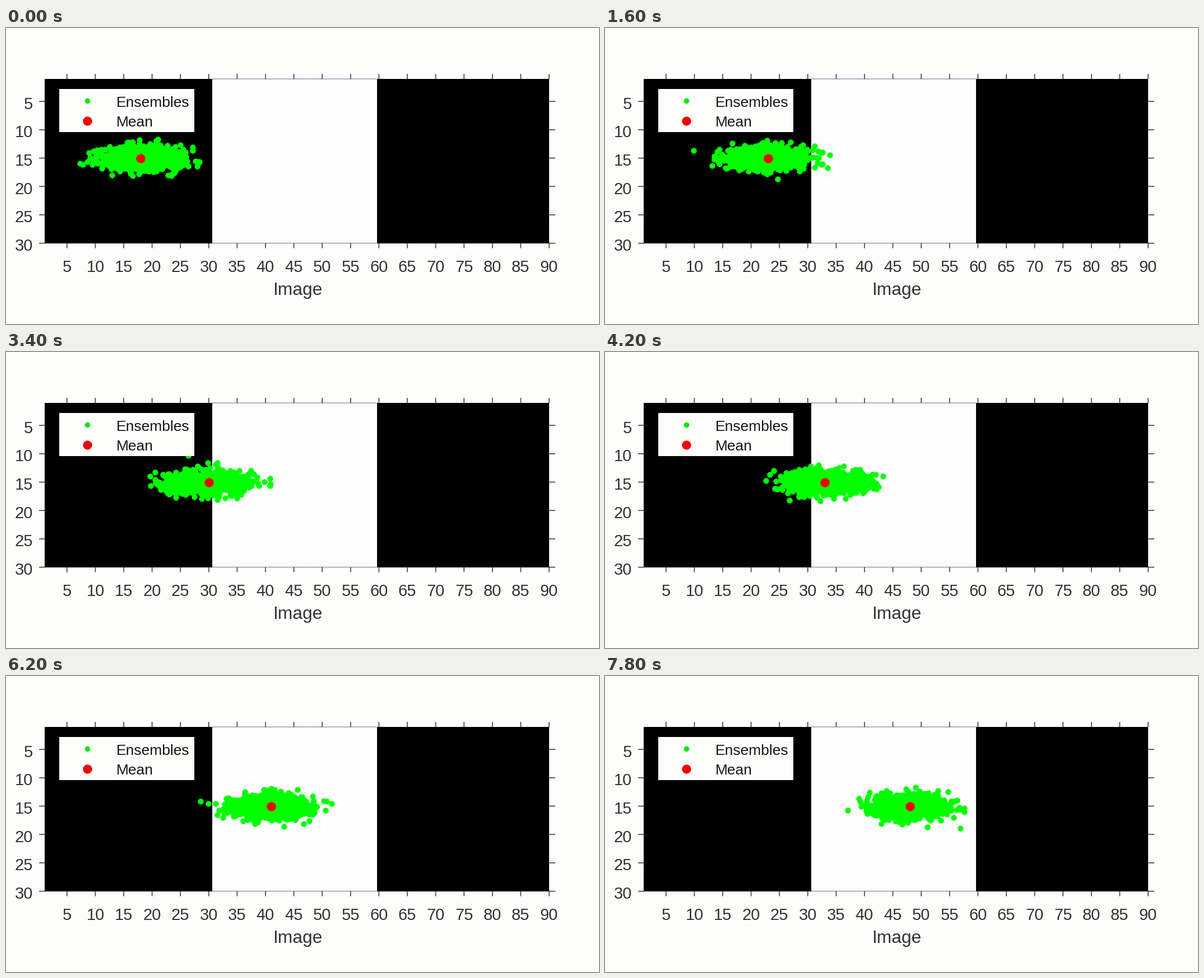
Write a matplotlib script that moves like this. It is 1058x529 px and loops after 8000 ms.

```python
import numpy as np
import matplotlib.pyplot as plt
from matplotlib.animation import FuncAnimation
from matplotlib.patches import Rectangle

W, H, DPI = 1058, 529, 100
FRAMES, INTERVAL = 40, 200
PT = 72 / DPI

PAPER, INK, TICK = "#fdfdfb", "#333333", "#3c3c3c"
GREEN, RED = "#00ff00", "#f00000"
START, ROW = 18, 15
SPREAD = np.array([3.4, 1.0])
MEMBERS = 1000


def px(col):
    return 58.2 + 10.12 * col


def py(row):
    return 80.4 + 10.14 * row


fig = plt.figure(figsize=(W / DPI, H / DPI), dpi=DPI, facecolor=PAPER)
ax = fig.add_axes([0, 0, 1, 1])
ax.set(xlim=(0, W), ylim=(H, 0))
ax.axis("off")


def box(x0, y0, x1, y1, color, z):
    ax.add_patch(Rectangle((x0, y0), x1 - x0, y1 - y0, fc=color, lw=0, zorder=z))


def line(x0, y0, x1, y1, color=TICK, width=1.6):
    ax.plot([x0, x1], [y0, y1], color=color, lw=width * PT, zorder=2,
            solid_capstyle="butt", snap=False)


def label(x, y, text, size, ha="center", color=INK):
    ax.text(x, y, text, size=size * PT, ha=ha, va="baseline", color=color,
            family="Liberation Sans", zorder=6)


def dots(x, y, radius, color, z):
    return ax.scatter(x, y, s=(2 * radius * PT) ** 2, c=color, lw=0, zorder=z)


LEFT, RIGHT, TOP, BOTTOM = 69, 969, 91, 384.5
BAND_START, BAND_END = 368, 661.5

# Image: black, white and black bands
box(LEFT, TOP, RIGHT, BOTTOM, "black", 1)
box(BAND_START, TOP, BAND_END, BOTTOM, "#fcfcfc", 1.5)
for y in (TOP, BOTTOM):
    line(BAND_START, y, BAND_END, y, "#8e8e98", 1.3)

# Ticks point outwards on all four sides
for col in range(5, 91, 5):
    x = px(col)
    line(x, TOP - 9, x, TOP)
    line(x, BOTTOM, x, BOTTOM + 9)
    label(x, 436.5, str(col), 29)
for row in range(5, 31, 5):
    y = py(row)
    line(LEFT - 10, y, LEFT, y)
    line(RIGHT, y, RIGHT + 11, y)
    label(48, y + 13.5, str(row), 29, ha="right")
label(520.5, 477.5, "Image", 31.8)

# Legend
box(94.5, 109, 336, 185.5, PAPER, 5)
dots([145], [129.5], 4.8, "#00ea10", 6)
dots([145], [165.5], 8.1, RED, 6)
label(197, 141, "Ensembles", 26.4, ha="left", color="#151515")
label(197, 176, "Mean", 26.4, ha="left", color="#151515")

cloud = dots([], [], 5.2, GREEN, 3)
mean = dots([], [], 8.2, RED, 4)


def members(center):
    rng = np.random.default_rng(center)
    col, row = (rng.normal((center, ROW), SPREAD, (MEMBERS, 2))).T
    return np.column_stack([px(col), py(row)])


def draw(i):
    # Four columns every five frames, after a short hold at the start
    center = START + max(0, 4 * i // 5 - 1)
    cloud.set_offsets(members(center))
    mean.set_offsets([(px(center), py(ROW))])
    return cloud, mean


anim = FuncAnimation(fig, draw, frames=FRAMES, interval=INTERVAL,
                     repeat=True, repeat_delay=0)
plt.show()
```
